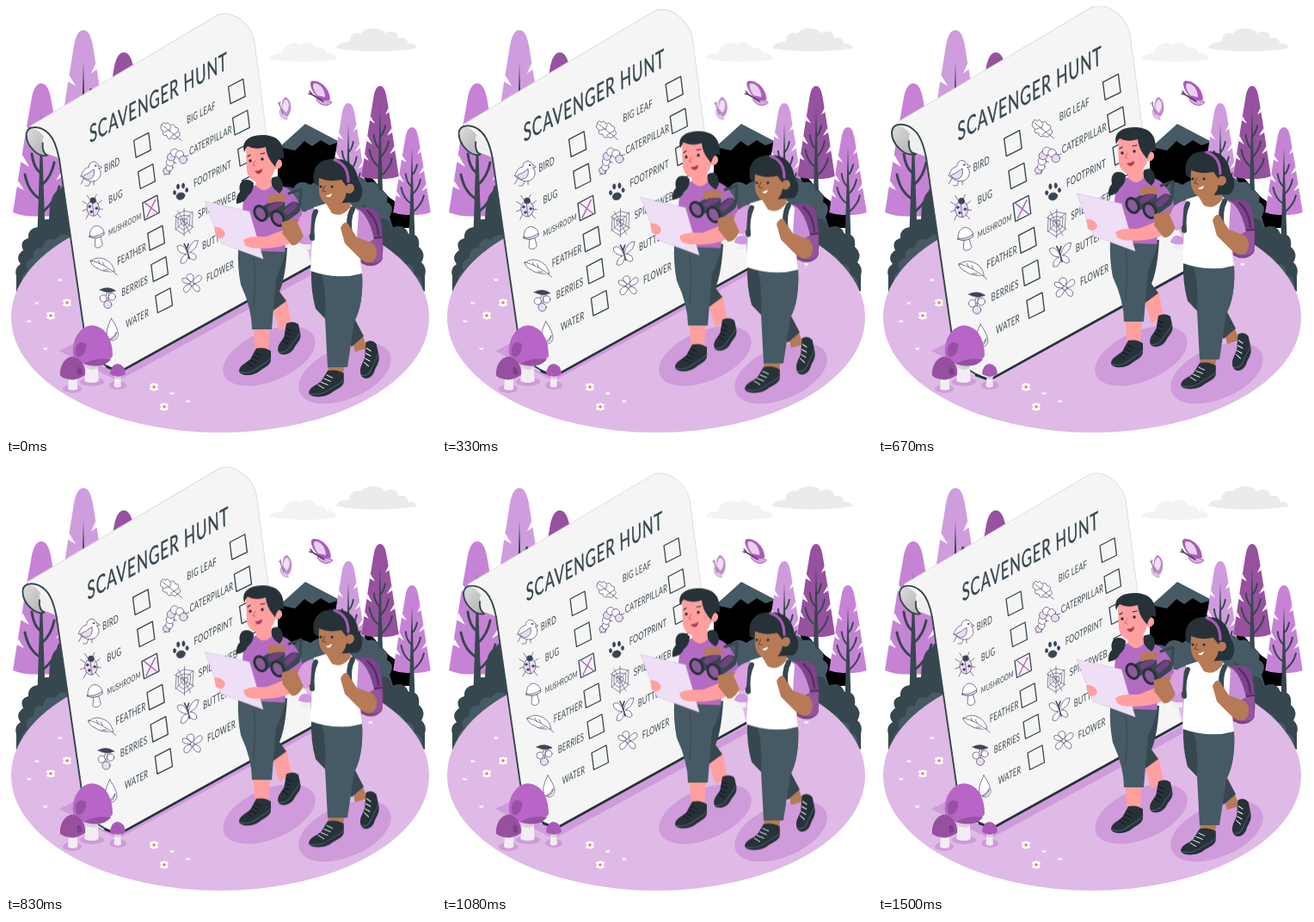
These frames come from a looping animation (500x500 px, 1.54 s). An HTML page without scripts:

```html
<!DOCTYPE html>
<html lang="en">
<head>
<meta charset="utf-8">
<title>Scavenger hunt</title>
<style>
html, body { margin: 0; height: 100%; overflow: hidden; background: #fff; }
svg { display: block; width: 100%; height: 100%; }
.sheet { transform-origin: 193px 212px; animation: pulse 1540ms linear infinite; }
.walkers { animation: bob 1540ms linear infinite; }
.flutter { animation: drift 1540ms linear infinite; }
@keyframes pulse {
  0% { transform: scale(1.008); }
  8.8% { transform: scale(1.094); }
  28.2%, 38% { transform: scale(1); }
  47.7% { transform: scale(1.094); }
  57.5%, 100% { transform: scale(1); }
}
@keyframes bob {
  0%, 97.4%, 100% { transform: translateY(0); }
  48% { transform: translateY(-10px); }
}
@keyframes drift {
  0%, 97.4%, 100% { transform: translateX(0); }
  30% { transform: translateX(.6px); }
  52% { transform: translateX(1.2px); }
  71% { transform: translateX(-1.8px); }
}
text { font-family: Lato, "Open Sans", sans-serif; font-size: 12.5px; letter-spacing: .03em; fill: #37474f; }
.title { font-size: 28px; letter-spacing: .05em; stroke: #37474f; stroke-width: .4; }
.small { font-size: 10px; }
.box { fill: none; stroke: #37474f; stroke-width: 1.3; stroke-linejoin: round; }
.icon { fill: #fff; stroke: #4d4468; stroke-width: .7; stroke-linecap: round; stroke-linejoin: round; }
.tint { fill: #ecdcf3; }
.ink { fill: #37474f; }
.line { fill: none; stroke-linecap: round; stroke-linejoin: round; }
.slate { fill: #455a64; }
.deep { fill: #37474f; }
.night { fill: #263238; }
.pink { fill: #ff9f9f; }
.brown { fill: #b67a56; }
.plum { fill: #b36bc4; }
.shade { fill: #cf9bdb; }
</style>
</head>
<body>
<svg viewBox="0 0 500 500">
<defs>
  <linearGradient id="curl" x1="0" y1="0" x2="1" y2="1">
    <stop offset="0" stop-color="#dcdcdc"/><stop offset="1" stop-color="#aeaeae"/>
  </linearGradient>
  <linearGradient id="page" x1="0" y1="0" x2=".35" y2=".65">
    <stop offset="0" stop-color="#f3f3f3"/><stop offset=".3" stop-color="#fbfbfb"/><stop offset=".42" stop-color="#f5f5f5"/>
  </linearGradient>
  <g id="tree">
    <path fill="currentColor" d="M0 0C-6 0-9 7-11 16L-19 62-33 150Q-18 156 0 154 18 156 33 150L19 62 11 16C9 7 6 0 0 0Z"/>
    <path fill="#fff" d="M-17 50-9 62-18.500 57ZM-22 83-14 97-24 91ZM-27 113-20 124-28.500 120ZM15 36 9 48 16.500 43ZM20 70 12 83 21.500 77ZM25 100 17 113 26.500 107Z"/>
    <path class="deep" d="M0 36L5 190H-5Z"/>
    <path class="line" stroke="#37474f" stroke-width="3" d="M0 84Q6 80 9 66M-1 104Q-9 98-11 82M1 118Q12 108 15 92M-2 134Q-15 126-19 106M1 150Q18 136 21 120"/>
  </g>
  <path id="box" class="box" d="M0 0 17-9 19.5 11 2.500 19.500Z"/>
  <g id="daisy">
    <path stroke="#fff" stroke-width="3.6" stroke-linecap="round" d="M-3-2 3 2M-3 2 3-2M0-3V3"/>
    <circle r="1.8" fill="#d98a4e"/>
  </g>
  <path id="fleck" d="M-2.5-1.5 0 0 2-2 1.500 1 3 2 0 1.500-2 2Z" fill="#fff"/>
  <g id="moth">
    <path fill="#a95bba" d="M-3 4C-12-6-13-15-8-15 3-15 12-4 12 7 6 9 0 8-3 4Z"/>
    <path fill="#ead0ef" d="M-3 2C-9-6-9-12-6-12 1-12 6-4 6 4Z"/>
    <path fill="#d9a9e2" stroke="#8a4a9a" stroke-width=".8" d="M-3 5C4 8 11 7 14 10 10 15 1 15-4 7Z"/>
    <path class="line" stroke="#5b3568" stroke-width="1.500" d="M-9 1 4 9M-9 1-13 0M-9 1-12-3"/>
  </g>
  <g id="shoe">
    <path class="night" d="M1 26C1 20 8 18 14 13L21 1Q31-1 38 4V11C39 20 31 21 25 26 18 32 2 32 1 26Z"/>
    <path class="line" stroke="#455a64" d="M2 27C14 30 20 24 26 20Q36 15 38 11"/>
    <path class="line" stroke="currentColor" stroke-width=".9" d="M11 17 17 21M14 14 21 17M17 10 24 13M20 6 26 9"/>
  </g>
  <g id="stem"><path fill="#f1edf2" d="M-6 0H6L7 19Q0 23-8 19Z"/><path fill="#d8d0db" d="M-6 0H6V6Q0 9-6 5Z"/></g>
</defs>

<rect width="500" height="500" fill="#fff"/>
<path fill="#f3f3f3" d="M306 61C311 53 320 57 322 54 323 43 337 41 342 45 349 39 358 43 361 49 367 46 372 51 373 55 379 53 384 58 385 62 360 66 330 66 306 61Z"/>
<path fill="#ebebeb" d="M384 49C387 40 397 44 400 40 399 31 410 30 413 32 419 23 437 25 441 32 449 26 457 32 456 38 464 34 468 41 467 44 473 43 477 46 478 49 450 54 410 54 384 49Z"/>

<g>
  <use href="#tree" transform="translate(137 54)" color="#96529f"/>
  <use href="#tree" transform="translate(90 28) scale(.98 1.050)" color="#cf9ddd"/>
  <use href="#tree" transform="translate(41 90)" color="#c683d5"/>
  <path d="M316 168 348 138 392 162 445 222 470 240V258H316Z"/>
  <path class="slate" d="M318 164 348 137 388 158 376 162 366 156 356 163 347 157 336 168Z"/>
  <use href="#tree" transform="translate(398 113) scale(.650 .680)" color="#cf9bdc"/>
  <use href="#tree" transform="translate(435 93) scale(.660 .700)" color="#96519f"/>
  <use href="#tree" transform="translate(472 141) scale(.660)" color="#c683d5"/>
</g>

<path class="deep" d="M12 332V314Q9 305 17 300 10 291 20 284 15 273 26 270 25 259 37 257 38 247 50 248 51 216 62 214 70 200 85 210V332Z"/>
<path class="slate" d="M20 326Q15 314 25 308 20 297 32 293 31 281 43 281 45 268 57 272 64 262 76 268L88 330Z"/>
<path class="slate" d="M310 290V226Q320 205 334 212 341 200 354 208 366 198 378 207 388 195 400 204 412 194 420 205 433 202 434 214 446 216 443 228 453 233 446 245L460 290Z"/>
<path class="deep" d="M487 332V314Q490 304 483 298 489 288 480 280 482 264 468 265 463 252 449 258 445 244 434 248L415 230 400 300Z"/>
<path class="slate" d="M484 330Q485 314 474 312 476 300 464 300 459 286 446 290L436 310Z"/>

<ellipse cx="249" cy="362" rx="243" ry="134" fill="#dfbae6"/>
<path class="shade" d="M62 401 90 387 128 424 355 304 362 309 130 436Z"/>
<ellipse class="shade" cx="306" cy="407" rx="57" ry="29" transform="rotate(-23 306 407)"/>
<ellipse class="shade" cx="394" cy="427" rx="57" ry="30" transform="rotate(-23 394 427)"/>
<use href="#daisy" x="52" y="360"/><use href="#daisy" x="71" y="345"/>
<use href="#daisy" x="172" y="443"/><use href="#daisy" x="184" y="466"/>
<use href="#fleck" x="63" y="318"/><use href="#fleck" x="36" y="345"/><use href="#fleck" x="27" y="366"/>
<use href="#fleck" x="46" y="398"/><use href="#fleck" x="193" y="450"/><use href="#fleck" x="212" y="459"/><use href="#fleck" x="424" y="300"/>

<g class="sheet">
  <path fill="url(#page)" stroke="#dedede" d="M30 140 246 12C264 6 284 23 288 42L302 150 310 210 344 262 354 301 133 423Q103 417 95 398L63 178 48 160Z"/>
  <path fill="url(#curl)" d="M26 145C33 138 46 148 51 164L48 175C35 176 23 160 26 145Z"/>
  <path fill="#f0f0f0" d="M44 153C54 154 59 164 62 177L52 173Q45 172 44 165Z"/>
  <path class="line" stroke="#37474f" stroke-width="1.900" d="M49 174C39 177 25 163 25 150 26 139 41 139 51 149 58 156 61 168 63 178L93 385Q97 412 133 423M49 174Q43 170 44 160"/>
  <path class="line" stroke="#263238" stroke-width="2.600" d="M118 418 133 423.500 354 301"/>

  <g>
    <text class="title" transform="matrix(.594 -.320 .03 1 98 160)">SCAVENGER HUNT</text>
    <text transform="matrix(.594 -.315 .03 1 115 194)">BIRD</text>
    <text transform="matrix(.594 -.315 .03 1 120 230)">BUG</text>
    <text class="small" transform="matrix(.594 -.315 .03 1 120 267)">MUSHROOM</text>
    <text transform="matrix(.594 -.315 .03 1 130 301)">FEATHER</text>
    <text transform="matrix(.594 -.315 .03 1 135 337)">BERRIES</text>
    <text transform="matrix(.594 -.315 .03 1 140 373)">WATER</text>
    <text transform="matrix(.594 -.315 .03 1 210 138)">BIG LEAF</text>
    <text transform="matrix(.594 -.315 .03 1 213 174)">CATERPILLAR</text>
    <text transform="matrix(.594 -.315 .03 1 218 211)">FOOTPRINT</text>
    <text transform="matrix(.594 -.315 .03 1 223 247)">SPIDERWEB</text>
    <text transform="matrix(.594 -.315 .03 1 228 283)">BUTTERFLY</text>
    <text transform="matrix(.594 -.315 .03 1 233 320)">FLOWER</text>
  </g>

  <use href="#box" x="149" y="157"/><use href="#box" x="154" y="193"/><use href="#box" x="159" y="229"/>
  <use href="#box" x="165" y="264"/><use href="#box" x="169" y="300"/><use href="#box" x="174" y="336"/>
  <use href="#box" x="258" y="95"/><use href="#box" x="263" y="131"/><use href="#box" x="269" y="167"/><use href="#box" x="274" y="203"/>
  <path class="line" stroke="#b065bf" stroke-width="1.400" d="M162 229 177 241M174 225 164 245"/>

  <g class="icon">
    <path d="M88 198Q91 188 97 188 97 182 103 181 109 183 109 189 114 197 106 203 98 207 88 198Z"/>
    <path class="tint" d="M90 198Q97 195 103 190 105 201 96 202Z"/>
    <path d="M109 186 112 188 108 189M92 200 88 207M99 204 97 209 93 209M103 204 103 208"/><circle class="ink" cx="105" cy="186" r=".8"/>
    <path d="M95 230 90 227M95 236 90 238M97 241 94 247M107 230 112 226M109 236 113 236M107 241 111 246M99 226 95 220M103 225 106 219"/>
    <ellipse class="tint" cx="102" cy="235" rx="7" ry="9"/><circle class="ink" cx="102" cy="226" r="3.300"/>
    <path d="M101 228 103 244"/><circle class="ink" cx="98" cy="233" r="1.300"/><circle class="ink" cx="106" cy="235" r="1.300"/><circle class="ink" cx="100" cy="239" r="1.300"/>
    <path d="M105 267 104 279Q109 283 113 277L110 266Z"/>
    <path d="M98 268Q98 256 106 255 114 256 115 264 107 272 98 268Z"/><path class="tint" d="M98 267Q106 269 114 263L115 265Q107 272 98 268Z"/>
    <path d="M99 296Q108 289 118 295 125 299 127 308 113 309 107 304 101 302 99 296Z"/><path d="M99 295Q115 299 130 312M110 299 108 295M115 301 113 297M119 306 114 306"/>
    <path class="ink" d="M110 329Q119 324 128 330 119 334 110 329Z"/><path d="M120 327 116 339M121 328 124 337M121 328 119 345"/>
    <circle cx="114" cy="339" r="4"/><circle cx="124" cy="337" r="4"/><circle class="tint" cx="119" cy="346" r="4.500"/>
    <path d="M123 362Q132 375 131 382 127 391 119 385 115 378 123 362Z"/><path class="tint" d="M129 378Q129 386 121 386 127 383 129 378Z"/>
    <path d="M181 139Q182 134 186 138 188 134 191 140 195 136 197 142 202 142 200 146 205 151 199 153 198 157 193 154 188 157 187 151 181 152 183 146 178 144 181 139Z"/><path d="M183 140 204 157M190 146 192 141M195 150 200 147M189 145 184 147M195 150 191 153"/>
    <circle class="tint" cx="187" cy="192" r="4"/><circle cx="190" cy="188" r="4"/><circle cx="191" cy="182" r="4.500"/><circle class="tint" cx="192" cy="176" r="4.500"/><circle cx="196" cy="171" r="4.500"/><circle cx="202" cy="173" r="4.500"/><circle class="tint" cx="206" cy="179" r="4.500"/><path d="M186 195 184 197M190 193 190 196M195 182 198 183M208 175 212 174"/>
    <g class="ink"><ellipse cx="203" cy="221" rx="5" ry="4" transform="rotate(-20 203 221)"/><ellipse cx="196" cy="217" rx="1.500" ry="2.500"/><ellipse cx="200" cy="210" rx="1.500" ry="3"/><ellipse cx="206" cy="209" rx="1.500" ry="3"/><ellipse cx="210" cy="214" rx="1.500" ry="2.500"/></g>
    <path fill="none" stroke-width=".6" d="M207 235V267M196 244 218 257M197 260 217 239M200 238 214 264M207 247 211 248 210 253 206 255 203 252 203 248ZM207 243 214 244 213 255 206 260 200 256 200 246ZM207 238 217 240 216 258 206 265 197 259 198 243Z"/>
    <path d="M211 286Q205 274 199 279 199 287 210 288 203 290 203 298 209 301 212 290 217 297 221 293 221 286 213 286 222 282 223 272 215 271 211 286Z"/><path class="line" stroke-width="1.600" d="M210 282 213 293M210 282 207 276M210 282 212 276"/>
    <path d="M215 320Q206 314 212 311 220 309 217 319 224 309 227 314 228 320 218 322 228 325 224 331 219 332 216 324 211 335 207 331 204 325 214 322 203 322 205 316 209 314 215 320Z"/><circle class="tint" cx="216" cy="322" r="2.500"/>
  </g>
</g>

<g>
  <path fill="#f1edf2" d="M344 274H353L354 283H343Z"/><path fill="#cf98dd" d="M340 275Q342 266 349 267 356 268 357 276 348 279 340 275Z"/>
  <ellipse class="shade" cx="100" cy="437" rx="14" ry="5"/><ellipse class="shade" cx="77" cy="445" rx="11" ry="5"/><ellipse class="shade" cx="130" cy="441" rx="10" ry="5"/>
  <use href="#stem" transform="translate(100 415) scale(1.100)"/>
  <path fill="#b765c7" d="M78 397C80 379 94 367 107 373 118 377 124 390 124 407 116 420 99 421 88 415 79 412 77 406 78 397Z"/>
  <path fill="#9750a5" d="M81 398Q84 387 93 393 94 404 86 408 80 409 81 398ZM91 416Q104 408 122 411 112 423 91 416Z"/>
  <use href="#stem" transform="translate(78 429) scale(.750 .850)"/>
  <path fill="#96509f" d="M63 430C62 415 72 406 79 408 88 410 93 420 92 429 83 436 71 436 63 430Z"/><path fill="#7d3f88" d="M83 420Q89 419 88 428 81 432 83 420Z"/>
  <use href="#stem" transform="translate(130 429) scale(.550 .700)"/>
  <path fill="#a959b8" d="M121 428Q122 416 130 416 138 417 139 428 130 434 121 428Z"/>
</g>

<g class="flutter">
  <use href="#moth" transform="translate(365 102)"/>
  <use href="#moth" transform="translate(324 119) rotate(40) scale(.750)" opacity=".7"/>
</g>

<g class="walkers">
  <!-- companion with the map -->
  <g color="#0c1215">
    <path class="pink" d="M309 348 326 340 332 370 318 378ZM287 370 307 370 305 402 290 405Z"/>
    <use href="#shoe" transform="translate(313 367) rotate(-12 20 20) scale(.800 1.180)"/>
    <use href="#shoe" transform="translate(270 397) scale(1 1.060)"/>
    <path class="deep" d="M285 281H327Q325 316 318 332L326 343 311 354 296 336Z"/>
    <path class="slate" d="M270 282 326 281Q322 300 314 316L309 376H286Q286 352 273 324 269 304 270 282Z"/>
    <path class="line" stroke="#37474f" d="M288 294Q291 312 288 350"/>
    <path class="plum" d="M277 214 293 207 318 208Q338 213 345 243L327 257 324 286 271 284Z"/>
    <path class="pink" d="M290 197 308 195 309 209Q300 219 291 209Z"/>
    <path class="night" d="M275 203Q283 200 288 206 288 216 281 221 279 228 268 230 267 221 272 216 270 208 275 203ZM309 200Q318 195 321 204 324 212 318 218L313 214Q307 208 309 200Z"/>
    <path class="pink" d="M279 164Q292 154 309 163L314 178Q322 177 321 185 318 191 313 189 309 203 298 206 283 205 280 192Z"/>
    <path class="night" d="M277 170C273 155 285 150 300 150 317 151 324 160 323 178 319 175 315 179 313 187L309 182Q303 174 302 164 290 168 281 163 278 166 277 170Z"/>
    <path class="line" stroke="#d8636b" d="M290 180 287 185 290 186"/><path fill="#b23d50" d="M289 192Q294 192 298 189 298 196 292 195Z"/>
    <circle class="night" cx="284" cy="180" r="1.700"/><circle class="night" cx="298" cy="178" r="1.700"/>
    <path class="line" stroke="#263238" stroke-width="1.200" d="M281 175 284 173M296 172 301 171"/>
    <path class="pink" d="M326 259 342 248 338 271Q325 282 295 282L278 279Q274 274 280 270L303 268Z"/>
    <path fill="#eedff6" stroke="#d7c3e5" stroke-width=".7" d="M231 227 283 239 299 294 250 276Z"/>
    <path class="pink" d="M242 257Q252 256 255 265 252 273 244 268ZM276 272Q286 266 303 269L302 279Q289 285 278 278Z"/>
  </g>

  <!-- companion with the backpack -->
  <g color="#fff">
    <path class="brown" d="M401 382 415 384 420 398 406 402ZM374 415 394 417 391 432 375 431Z"/>
    <use href="#shoe" transform="translate(408 389) rotate(-12 15 20) scale(.680 1.400)"/>
    <use href="#shoe" transform="translate(351 423) scale(1.100 1.030)"/>
    <path class="deep" d="M355 306 414 311Q416 345 405 363L416 384 402 396 360 352Q354 330 355 306Z"/>
    <path class="slate" d="M366 308 414 311Q416 348 405 367L397 420H374L371 363Q373 330 366 308Z"/>
    <path fill="#7d438b" d="M406 236Q426 230 434 242 441 272 437 296 427 307 413 299Z"/>
    <path fill="#95549f" d="M417 270 437 268 438 294Q430 302 419 297Z"/><path class="line" stroke="#4f2c5b" stroke-width="2" d="M420 238Q432 248 433 266M418 271 437 269"/>
    <path fill="#c88fd8" d="M357 235Q344 238 340 250L346 270 358 266ZM403 234Q420 236 428 271L409 282 398 260Z"/>
    <path fill="#fff" d="M358 234 374 229 400 230 410 239 408 270 414 311Q386 319 354 308L356 270Q352 250 358 234Z"/>
    <path class="brown" d="M376 224 399 222 401 233Q391 247 379 241L373 231Z"/>
    <path class="line" stroke="#37474f" stroke-width="6" d="M403 236Q397 247 400 265M360 239Q354 252 356 270"/>
    <path class="brown" d="M389 258Q395 246 400 257L408 269 427 276Q435 286 428 296 420 303 408 290L394 276Z"/>
    <path class="night" d="M358 205C355 185 367 177 382 178 401 177 408 190 410 203 416 211 416 222 409 228L391 229Z"/>
    <path class="brown" d="M363 194 393 194 396 208Q405 204 405 213 402 220 396 217 394 230 382 233 366 232 364 216Z"/>
    <path class="night" d="M358 206Q358 186 374 183 393 182 399 199L396 210 390 202Q375 205 364 200L363 209Z"/>
    <path class="line" stroke="#a75bb8" stroke-width="3.200" d="M382 179Q398 184 398 204"/>
    <circle class="night" cx="366" cy="210" r="1.600"/><circle class="night" cx="379" cy="210" r="1.600"/>
    <path class="line" stroke="#7b4735" stroke-width="1.100" d="M371 209 368 215 372 216"/>
    <path fill="#fff" d="M372 221 379 218Q378 223 374 222Z"/>
    <path class="brown" d="M341 247 348 262Q341 280 332 278L321 264 325 250Z"/>
    <path fill="#d9a0e2" d="M345 241 356 236 354 265 347 270 339 252Z"/>
    <path class="line" stroke="#37474f" stroke-width="15" d="M299 241 317 231M320 246 335 235"/>
    <path class="line" stroke="#714080" stroke-width="7" d="M308 235 319 229M327 239 335 232"/>
    <path class="line" stroke="#37474f" stroke-width="3" d="M329 218 343 213 342 232"/>
    <g fill="#8a5a9a" stroke="#263238" stroke-width="3"><ellipse cx="296" cy="241" rx="6.500" ry="9" transform="rotate(-30 296 241)"/><ellipse cx="316" cy="247" rx="6.500" ry="9" transform="rotate(-30 316 247)"/></g>
    <path class="brown" d="M304 221Q314 217 326 220L324 228Q314 226 306 230ZM320 252Q328 247 335 252L333 265 323 266Z"/>
  </g>
</g>
</svg>
</body>
</html>
```
